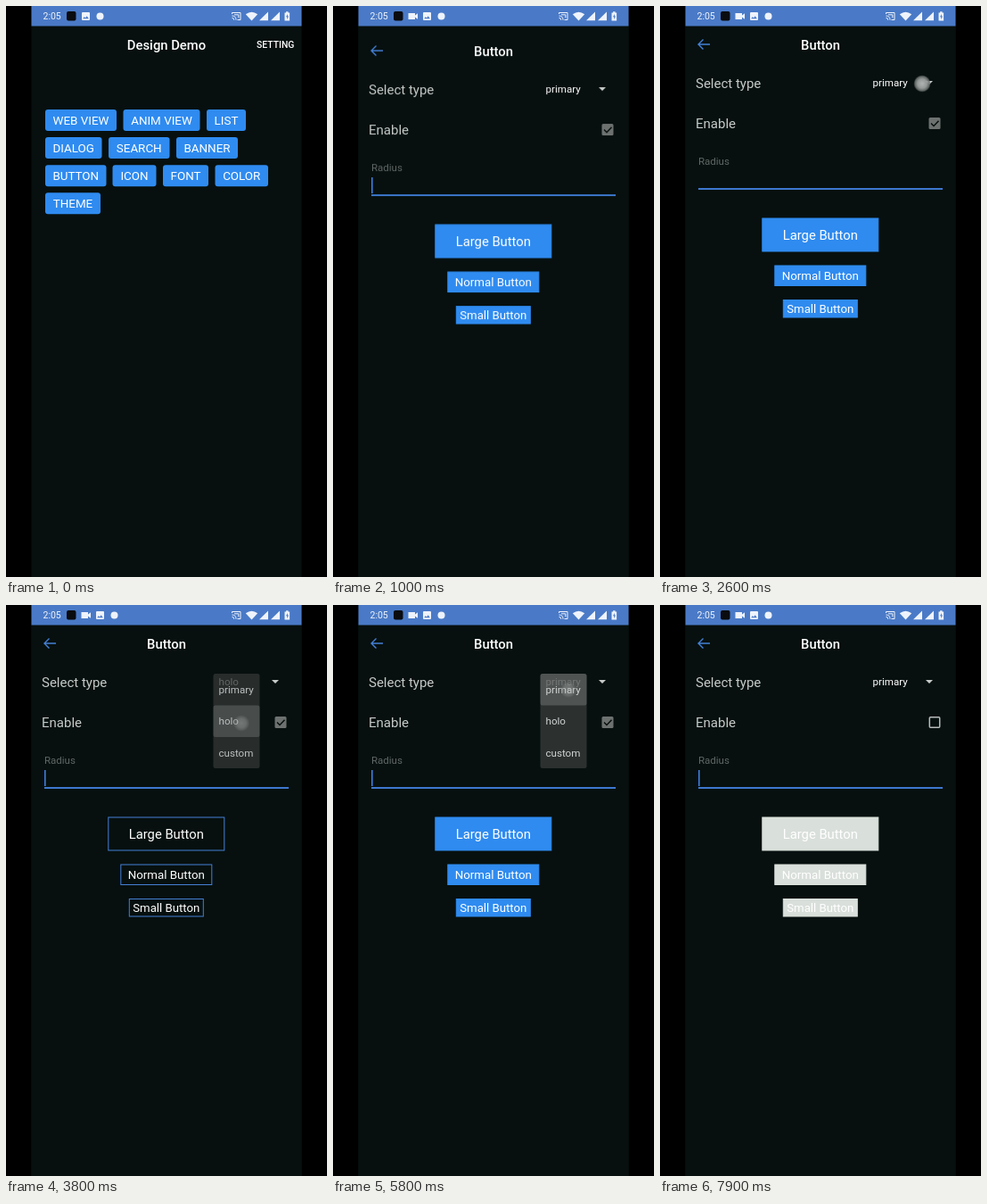
Animation, 360 px wide and 640 px high, one loop 8000 ms. Source, as an HTML page:

```html
<!DOCTYPE html>
<html lang="en">
<head>
<meta charset="utf-8">
<title>Design Demo</title>
<style>
  html, body { margin: 0; width: 100%; height: 100%; overflow: hidden; background: #000; }
  svg { display: block; width: 360px; height: 640px; font-family: Roboto, sans-serif; fill: #fff; }
  .mid { text-anchor: middle; }
  .title { font-size: 14.8px; font-weight: 500; text-anchor: middle; }
  .label { font-size: 15px; fill: #c6cbc9; }
  .small { font-size: 11.6px; }
  .app { fill: #07100f; }
  .blue { fill: #2f8bf0; }
  .line { fill: none; stroke: #4480d6; stroke-width: 1.4; }

  /* one loop is 8 s, so 1% is 80 ms */
  .anim { animation: 8s linear infinite; }
  .step { animation: 8s step-end infinite; }

  .shift { animation-name: shift; }
  @keyframes shift { 0%, 1% { transform: translateX(-16px); animation-timing-function: ease-out } 4%, 100% { transform: none } }
  .camera { animation-name: camera; }
  @keyframes camera { 0%, 1.5% { opacity: 0 } 4%, 100% { opacity: 1 } }
  .press { animation-name: press; }
  @keyframes press { 0%, 8% { fill: #2f8bf0 } 9.5%, 100% { fill: #5ba4f5 } }

  .page { animation-name: page; }
  @keyframes page { 0%, 10.7% { opacity: 0 } 12.5%, 100% { opacity: 1 } }
  .rise { animation-name: rise; }
  @keyframes rise {
    0%, 10.7% { transform: translateY(26px); animation-timing-function: cubic-bezier(.3, 0, .2, 1) }
    14.8%, 100% { transform: none }
  }

  .caret { animation-name: caret; }
  @keyframes caret {
    0%, 27.25%, 46%, 58.5%, 71%, 84.75%, 97.25%, 100% { opacity: 1 }
    22.25%, 32.25%, 52.25%, 61%, 78.5%, 91% { opacity: 0 }
  }

  .holo { animation-name: holo; }
  @keyframes holo { 0%, 72.25%, 100% { opacity: 0 } 47.25% { opacity: 1 } }
  .primary { animation-name: primary; }
  @keyframes primary { 0%, 72.25%, 100% { opacity: 1 } 47.25% { opacity: 0 } }
  .button { animation-name: button; }
  @keyframes button {
    0%, 72.25% { fill: #2f8bf0; stroke: #2f8bf0 }
    47.25% { fill: #07100f; stroke: #4480d6 }
    91%, 100% { fill: #d9dfda; stroke: #d9dfda }
  }

  .popup { animation-name: popup; }
  @keyframes popup {
    0%, 33.5%, 49.2%, 60.5%, 74.2%, 100% { opacity: 0 }
    36%, 46.25%, 63%, 71.25% { opacity: 1 }
    47.5% { opacity: .78 }
    72.5% { opacity: .87 }
  }
  .pick-holo { animation-name: pick-holo; }
  @keyframes pick-holo { 0%, 50%, 100% { opacity: 0 } 45.9% { opacity: .2 } }
  .pick-primary { animation-name: pick-primary; }
  @keyframes pick-primary { 0%, 75%, 100% { opacity: 0 } 70.9% { opacity: .2 } }

  .checked { animation-name: checked; }
  @keyframes checked { 0% { opacity: 1 } 91%, 100% { opacity: 0 } }
  .unchecked { animation-name: unchecked; }
  @keyframes unchecked { 0% { opacity: 0 } 91%, 100% { opacity: 1 } }
  .ripple { animation-name: ripple; }
  @keyframes ripple { 0%, 89.7% { opacity: 0; r: 7px } 91.2% { opacity: .16; r: 14px } 93% { opacity: .13; r: 16px } 96%, 100% { opacity: 0; r: 16px } }

  .tap { animation: tap 8s linear calc(var(--at) - 8s) infinite; }
  @keyframes tap { 0%, 1.25% { opacity: .9 } 3.75%, 100% { opacity: 0 } }
</style>
</head>
<body>
<svg viewBox="0 0 360 640">
  <defs>
    <radialGradient id="spot">
      <stop offset="0" stop-color="#c4c8c6"/>
      <stop offset=".55" stop-color="#a3a8a6"/>
      <stop offset=".85" stop-color="#686d6b"/>
      <stop offset="1" stop-color="#4a4f4d" stop-opacity=".3"/>
    </radialGradient>
  </defs>
  <rect width="360" height="640" fill="#000"/>
  <rect class="app" x="28.5" width="303" height="640"/>

  <g id="home">
    <text class="title" x="180" y="49">Design Demo</text>
    <text x="281" y="47" font-size="10.4" font-weight="500">SETTING</text>
  </g>

  <g class="page anim">
    <rect class="app" x="28.5" y="22" width="303" height="618"/>
    <g class="rise anim">
      <path class="line" d="M56 43H43M48.5 37.5L43 43L48.5 48.5"/>
      <text class="title" x="180" y="49">Button</text>
      <text class="label" x="40" y="91.5">Select type</text>
      <text class="small primary step" x="238.5" y="90">primary</text>
      <text class="small holo step" x="238.5" y="90">holo</text>
      <path d="M298 84h8l-4 4z" fill="#c6cbc9"/>

      <text class="label" x="40" y="137">Enable</text>
      <g class="checked step">
        <rect x="301.5" y="125" width="13" height="13" rx="1.5" fill="#6d7270"/>
        <path d="M304 131.5l3 3l5.5-5.8" fill="none" stroke="#07100f" stroke-width="1.5"/>
      </g>
      <rect class="unchecked step" x="302.3" y="125.8" width="11.4" height="11.4" rx="1" fill="none" stroke="#b6bbb9" stroke-width="1.5"/>
      <circle class="ripple anim" cx="308" cy="131.5" r="16"/>

      <text x="43" y="178" font-size="11.5" fill="#606765">Radius</text>
      <rect x="43" y="204" width="274" height="2" fill="#3d78d0"/>
      <rect class="caret step" x="43" y="185" width="1.6" height="18" fill="#3f7cdb"/>
      <g id="samples"></g>

      <g class="popup anim">
        <rect x="232.5" y="77" width="52" height="106" rx="2.5" fill="#333736"/>
        <rect class="pick-primary step" x="232.5" y="77" width="52" height="35.5" rx="2.5"/>
        <rect class="pick-holo step" x="232.5" y="112.5" width="52" height="35.5" rx="2.5"/>
        <g class="small" fill="#f2f4f3">
          <text x="238.5" y="99">primary</text>
          <text x="238.5" y="134">holo</text>
          <text x="238.5" y="170">custom</text>
        </g>
      </g>
    </g>
  </g>

  <g id="taps" fill="url(#spot)"></g>

  <g fill="#eef3fb">
    <rect x="28.5" width="303" height="22.5" fill="#4a7ac7"/>
    <text x="41.5" y="15.2" font-size="10.5">2:05</text>
    <rect x="68" y="6" width="10.5" height="10.5" rx="2" fill="#0a0c10"/>
    <path class="camera anim" d="M84.5 8h7.5v2.6l3-2.4v6.6l-3-2.4V15h-7.5z"/>
    <g class="shift anim">
      <path fill-rule="evenodd" d="M102 7h7q1 0 1 1v7q0 1-1 1h-7q-1 0-1-1V8q0-1 1-1zM102.2 14.3h6.6l-2.1-3-1.7 2.1-1.1-1.3z"/>
      <circle cx="121.5" cy="11.5" r="4"/>
    </g>
    <g fill="none" stroke="#eef3fb">
      <path d="M253.5 9V7.5h9.5v8h-3.5M253.5 11q4.5 0 4.5 4.7M253.5 13.3q2.2 0 2.2 2.4" />
      <path d="M256 9.8h4.8v3.5"/>
    </g>
    <path d="M268.8 9.2q6.7-5 13.4 0L275.500 16.500z"/>
    <path d="M284 16.200L294 6.500v9.700zM297 16.200L307 6.500v9.700z"/>
    <path fill-rule="evenodd" d="M312.500 7.500h1.600V6.300h2.400v1.200h1.600V16.500h-5.600zM315.800 9l-1.800 3.300h1.200V15l1.800-3.500h-1.200z"/>
  </g>
</svg>
<script>
  const put = (id, markup) => document.getElementById(id).insertAdjacentHTML('beforeend', markup);

  const rows = [
    [['WEB VIEW', 44, 80], ['ANIM VIEW', 131.5, 86], ['LIST', 225, 44]],
    [['DIALOG', 44, 63.5], ['SEARCH', 115, 68.5], ['BANNER', 191, 69]],
    [['BUTTON', 44, 68.5], ['ICON', 119.5, 49], ['FONT', 176, 51], ['COLOR', 234.5, 59.5]],
    [['THEME', 44, 62]]
  ];
  rows.forEach((row, i) => row.forEach(([name, x, w]) => {
    const y = 116 + i * 31.1;
    const look = name === 'BUTTON' ? 'press anim' : 'blue';
    put('home', `<rect class="${look}" x="${x}" y="${y}" width="${w}" height="24" rx="3"/>
      <text class="mid" x="${x + w / 2}" y="${y + 16.9}" font-size="13.4">${name}</text>`);
  }));

  const samples = [['Large', 131, 237.5, 38, 14.8], ['Normal', 103, 290.5, 23.5, 13.3], ['Small', 84, 329, 20.5, 13.2]];
  for (const [name, w, y, h, size] of samples) {
    put('samples', `<rect class="button step" x="${180.3 - w / 2}" y="${y + .5}" width="${w - 1}" height="${h - 1}"/>
      <text class="mid" x="179.800" y="${y + h / 2 + size * .37}" font-size="${size}">${name} Button</text>`);
  }

  const taps = [[2.58, 294, 87], [3.58, 264, 132.5], [4.74, 294, 87], [5.58, 264, 95], [7.18, 308, 131.5]];
  for (const [at, x, y] of taps) {
    put('taps', `<circle class="tap" style="--at:${at}s" cx="${x}" cy="${y}" r="9.5"/>`);
  }
</script>
</body>
</html>
```
